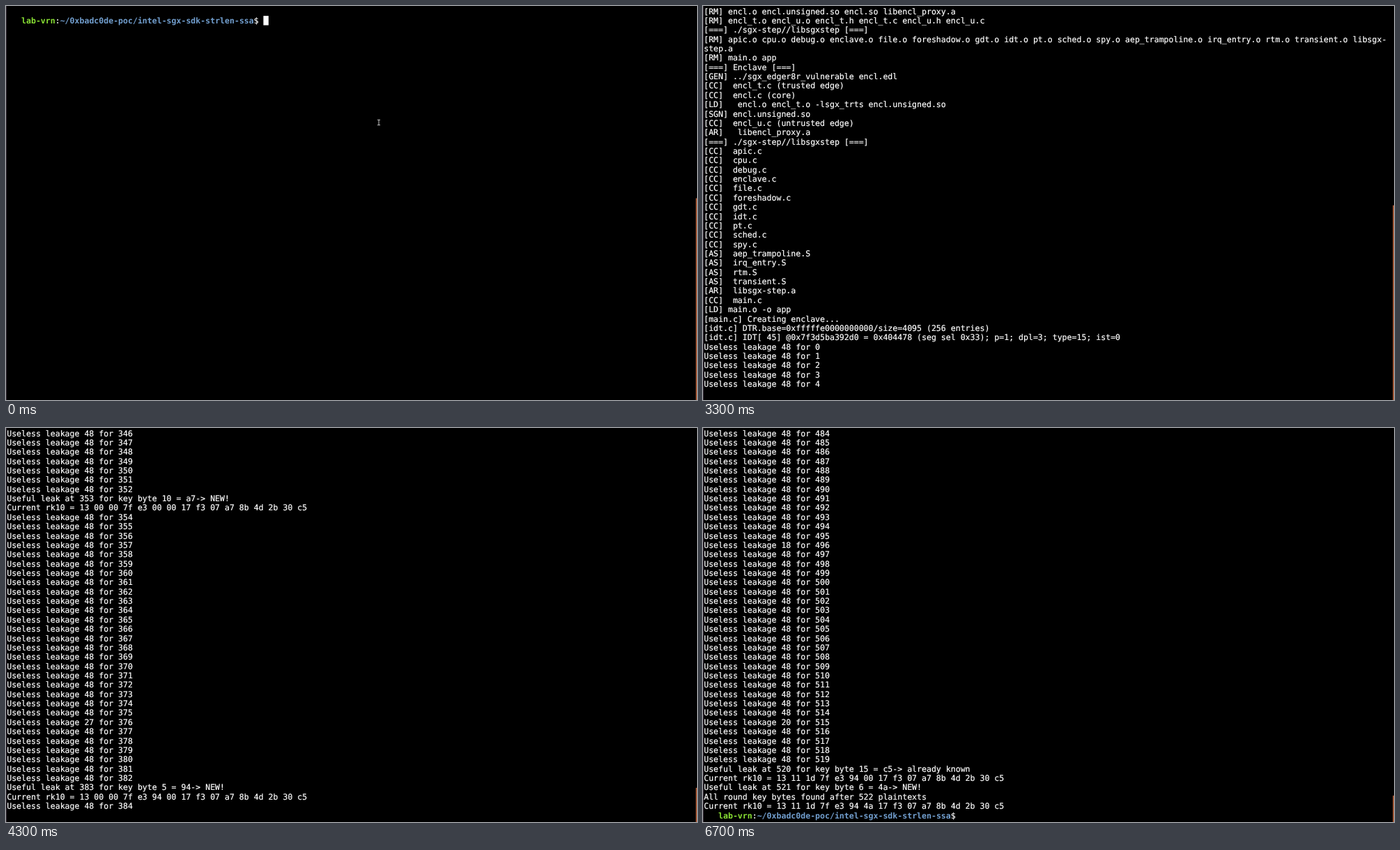
An HTML page that plays this animation: 992x565 px, repeating every 7100 ms.

```html
<!DOCTYPE html>
<html lang="en">
<head>
<meta charset="utf-8">
<title>Terminal</title>
<style>
  html, body { margin: 0; width: 100%; height: 100%; overflow: hidden; background: #000; }
  svg { display: block; width: 992px; height: 565px; background: #000; }
  text {
    font: 11.55px "DejaVu Sans Mono", monospace;
    fill: #fff;
    stroke: #fff;
    stroke-width: 0.2px;
    white-space: pre;
    text-rendering: geometricPrecision;
  }
  .host { fill: #8ae234; stroke: none; font-weight: bold; }
  .path { fill: #729fcf; stroke: none; font-weight: bold; }
</style>
</head>
<body>
<svg viewBox="0 0 992 565">
  <rect width="1" height="565" fill="#352c38"/>
  <rect id="thumb" x="990.4" width="1.6" fill="#b8623c"/>
  <g id="screen"></g>
  <rect id="cursor" width="7.4" height="13.4" fill="#fff"/>
  <path id="mouse" d="M-2-3.7H2M0-3.7V3.7M-2 3.7H2" fill="none" stroke="#c8c8c8"/>
</svg>
<script>
const LOOP = 7100, STEP = 100;
const ROWS = 42, LINE = 13.366, CHAR = 6.953, LEFT = 1.2, TOP = 0.8, ASCENT = 10.7;
const HISTORY = 82;
const COMMAND = 'make run';
const PROMPT = [['', '   '], ['host', 'lab-vrn'], ['', ':'],
  ['path', '~/0xbadc0de-poc/intel-sgx-sdk-strlen-ssa'], ['', '$ ']];
const PROMPT_LEN = PROMPT.reduce((sum, [, s]) => sum + s.length, 0);

const sources = 'apic cpu debug enclave file foreshadow gdt idt pt sched spy'.split(' ');
const asm = 'aep_trampoline irq_entry rtm transient'.split(' ');

const log = [
  '',
  COMMAND,
  '[===] Enclave [===]',
  '[RM] encl.o encl.unsigned.so encl.so libencl_proxy.a',
  '[RM] encl_t.o encl_u.o encl_t.h encl_t.c encl_u.h encl_u.c',
  '[===] ./sgx-step//libsgxstep [===]',
  '[RM] ' + [...sources, ...asm].map(s => s + '.o').join(' ') + ' libsgx-',
  'step.a',
  '[RM] main.o app',
  '[===] Enclave [===]',
  '[GEN] ../sgx_edger8r_vulnerable encl.edl',
  '[CC]  encl_t.c (trusted edge)',
  '[CC]  encl.c (core)',
  '[LD]   encl.o encl_t.o -lsgx_trts encl.unsigned.so',
  '[SGN] encl.unsigned.so',
  '[CC]  encl_u.c (untrusted edge)',
  '[AR]   libencl_proxy.a',
  '[===] ./sgx-step//libsgxstep [===]',
  ...sources.map(s => `[CC]  ${s}.c`),
  ...asm.map(s => `[AS]  ${s}.S`),
  '[AR]  libsgx-step.a',
  '[CC]  main.c',
  '[LD] main.o -o app',
  '[main.c] Creating enclave...',
  '[idt.c] DTR.base=0xfffffe0000000000/size=4095 (256 entries)',
  '[idt.c] IDT[ 45] @0x7f3d5ba392d0 = 0x404478 (seg sel 0x33); p=1; dpl=3; type=15; ist=0',
];

const KEY = '13 11 1d 7f e3 94 4a 17 f3 07 a7 8b 4d 2b 30 c5'.split(' ');
const LAST = 521;

// Useful leaks come at a steady pace per phase, cycling through its key bytes
const PHASES = [
  { from: 5, to: 95, every: 10, bytes: [4, 13, 0, 8, 3, 14, 9] },
  { from: 109, to: 113, every: 4, bytes: [13, 7] },
  { from: 150, to: 310, every: 40, bytes: [11, 15, 12] },
  { from: 353, to: 383, every: 30, bytes: [10, 5] },
  { from: 400, to: 480, every: 40, bytes: [1, 2] },
  { from: 520, to: LAST, every: 1, bytes: [15, 6] },
];
const ODD = { 108: 28, 117: 20, 376: 27, 496: 18, 515: 20 };

function leakedByte(n) {
  const p = PHASES.find(p => n >= p.from && n <= p.to);
  if (!p || (n - p.from) % p.every) return -1;
  return p.bytes[(n - p.from) / p.every % p.bytes.length];
}

const found = KEY.map(() => '00');
const linesAfter = [];
for (let n = 0; n <= LAST; n++) {
  const i = leakedByte(n);
  if (i < 0) {
    log.push(`Useless leakage ${ODD[n] || 48} for ${n}`);
  } else {
    const state = found[i] === '00' ? 'NEW!' : 'already known';
    found[i] = KEY[i];
    log.push(`Useful leak at ${n} for key byte ${i} = ${KEY[i]}-> ${state}`);
    if (n === LAST) log.push(`All round key bytes found after ${n + 1} plaintexts`);
    log.push('Current rk10 = ' + found.join(' '));
  }
  linesAfter.push(log.length);
}

// [time, lines printed], linear in between
const PACE = [[0, 1], [1700, 1], [2200, 6], [2300, 6], [2400, 11], [2500, 12], [3000, 22],
  [3300, linesAfter[4]], [3600, linesAfter[133]], [4300, linesAfter[384]],
  [4700, log.length], [LOOP, log.length]];

function printed(t) {
  const i = PACE.findIndex(([time]) => time > t);
  const [t0, a] = PACE[i - 1], [t1, b] = PACE[i];
  return Math.round(a + (b - a) * (t - t0) / (t1 - t0));
}

function cursorOn(t) {
  if (t < 1000) return t < 600;
  if (t < 2500) return true;
  return (t - 2500) % 1200 < 600;
}

const $ = id => document.getElementById(id);
const svg = name => document.createElementNS('http://www.w3.org/2000/svg', name);
const rows = Array.from({ length: ROWS }, (_, i) => {
  const row = svg('text');
  row.setAttribute('x', LEFT);
  row.setAttribute('y', TOP + ASCENT + i * LINE);
  $('screen').append(row);
  return row;
});

function showPrompt(row, typed) {
  row.replaceChildren(...[...PROMPT, ['', typed]].map(([cls, s]) => {
    const span = svg('tspan');
    if (cls) span.setAttribute('class', cls);
    span.textContent = s;
    return span;
  }));
}

function draw(t) {
  const count = printed(t);
  const top = Math.max(0, count + 1 - ROWS);
  const typed = COMMAND.slice(0, Math.max(0, Math.floor((t - 900) / STEP)));
  const done = count === log.length;

  rows.forEach((row, i) => {
    const n = top + i;
    if (n === 1) showPrompt(row, typed);
    else if (done && n === count) showPrompt(row, '');
    else row.textContent = n < count ? log[n] : '';
  });

  let col = 0;
  if (count === 1) col = PROMPT_LEN + typed.length;
  else if (done) col = PROMPT_LEN;
  $('cursor').setAttribute('x', LEFT - 0.2 + col * CHAR);
  $('cursor').setAttribute('y', TOP + (count - top) * LINE);
  $('cursor').style.opacity = cursorOn(t) ? 1 : 0;

  const size = 565 * ROWS / (HISTORY + top);
  $('thumb').setAttribute('y', 565 - size);
  $('thumb').setAttribute('height', size);

  const k = Math.min(1, t / 800);
  $('mouse').setAttribute('transform', `translate(${535.2 - 43 * k} ${167 - 55 * k})`);
  $('mouse').style.opacity = t < 1000 ? 1 : 0;
}

let shown = -1;
const start = performance.now();
function tick() {
  const t = (performance.now() - start) % LOOP;
  const step = Math.floor(t / STEP);
  if (step !== shown) draw((shown = step) * STEP);
  requestAnimationFrame(tick);
}
tick();
</script>
</body>
</html>
```
